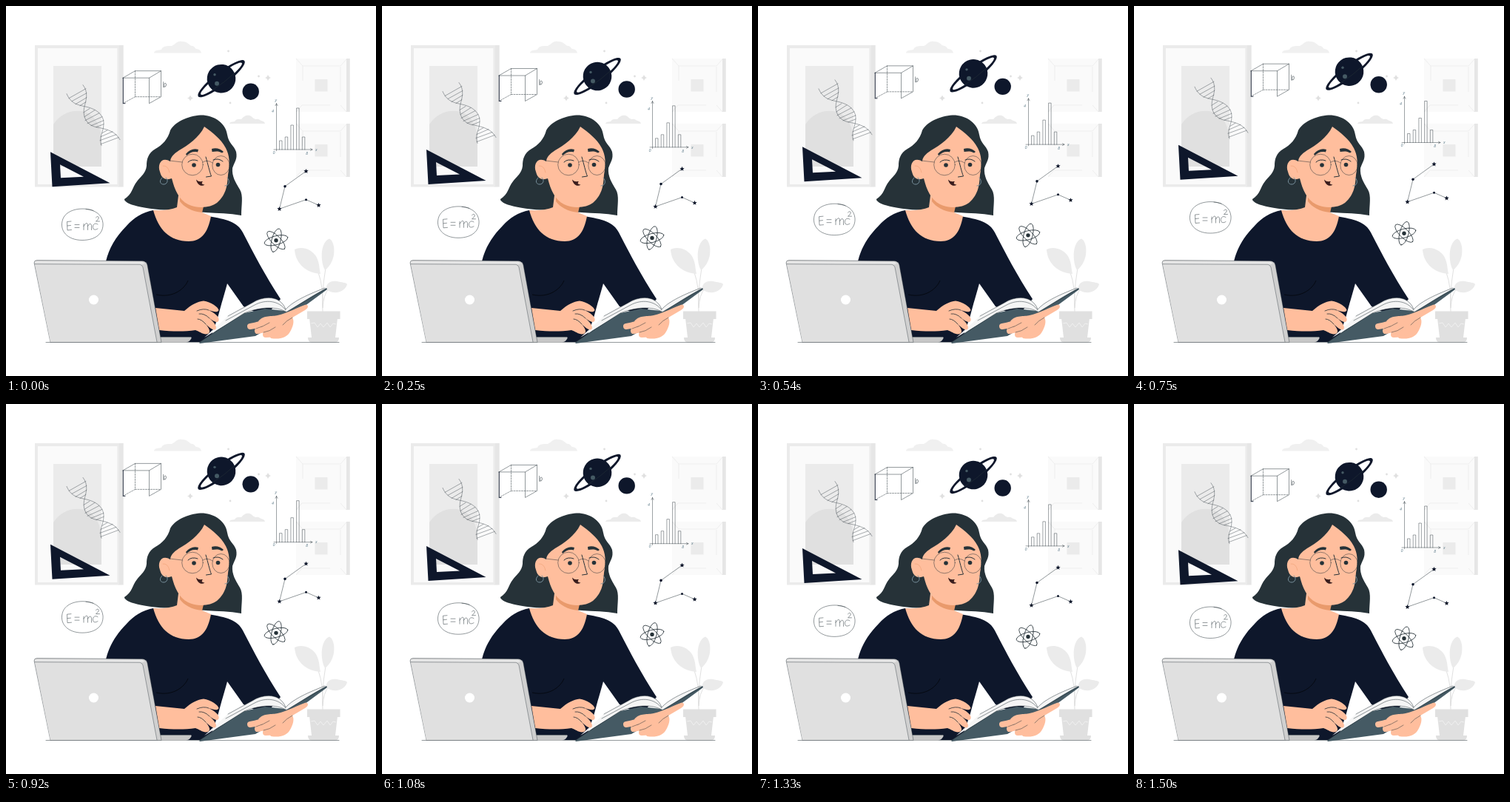
Recreate the animation shown at these times as an HTML page. Size 500 by 500 pixels, loop 1540 ms.

```html
<!DOCTYPE html>
<html lang="en">
<head>
<meta charset="utf-8">
<title>Studying science</title>
<style>
  html, body { margin: 0; height: 100%; overflow: hidden; background: #fff; }
  svg { display: block; width: 100vw; height: 100vh; }
  .navy { fill: #0e172b; }
  .hair { fill: #263238; }
  .skin { fill: #ffbe9d; }
  .line { fill: none; stroke: #263238; stroke-width: .5; stroke-linecap: round; stroke-linejoin: round; }
  .finger { fill: none; stroke: #ffbe9d; stroke-width: 8; stroke-linecap: round; }
  text { font: italic 5.5px "Open Sans", sans-serif; fill: #607d8b; }
</style>
</head>
<body>
<svg viewBox="0 0 500 500">
  <defs>
    <g id="frame">
      <path fill="#e6e6e6" d="M460 71h4.700v72h-4.700z"/>
      <path fill="#fafafa" d="M392 71h68v72h-68z"/>
      <path fill="none" stroke="#e6e6e6" stroke-width=".6" d="M392 71l9 10h51l8-9M401 81v20M452 82v34M392 143l8-9h38M452 134l8 9"/>
      <path fill="#ebebeb" d="M417.500 99h17v16.500h-17z"/>
    </g>
    <path id="spark" fill="#e0e0e0" d="M0-4.200Q.8-.8 4.200 0Q.8.8 0 4.200Q-.8.8-4.200 0Q-.8-.8 0-4.200z"/>
    <path id="star" class="navy" d="M0-3.200L.9-1.100 3.100-1 1.400.5 1.900 2.700 0 1.500-1.900 2.700-1.400.5-3.100-1-.9-1.100z"/>
    <ellipse id="orbit" class="line" style="stroke-width:.8" rx="16.300" ry="6"/>
  </defs>

  <!-- wall -->
  <path fill="#e6e6e6" d="M152 53h6.700v191.500H152z"/>
  <path fill="#ebebeb" d="M39 53h114v191.500H39z"/>
  <path fill="#fafafa" d="M43 57h107.500v184H43z"/>
  <path fill="#ebebeb" d="M64 81h65v136H64z"/>
  <path fill="#e0e0e0" d="M64 160C74 144 92 139 106 143C121 148 129 163 129 185V217H64z"/>
  <use href="#frame"/>
  <use href="#frame" y="88"/>
  <path fill="#f0f0f0" d="M200 63.500C201 59 206 60 210 59C212 53 220 54 224 54C229 52 230 47 238 48C247 48 247 54 252 54C255 54 255 58 258 58C262 59 263 60 264 63.500z"/>
  <path fill="#ebebeb" d="M302 159C303 156 306 157 309 156C311 152 315 153 318 153C321 149 325 147 329 148C333 149 334 153 338 153C342 152 343 155 345 155C348 156 349 156 350 159z"/>
  <use href="#spark" x="249" y="124.500"/>
  <use href="#spark" x="354" y="97"/>
  <g fill="#e0e0e0"><circle cx="300.500" cy="61" r="1.400"/><circle cx="303" cy="131" r="1.400"/><circle cx="341.500" cy="95" r="1.400"/></g>

  <!-- plant -->
  <path fill="none" stroke="#e0e0e0" d="M428 413Q426 390 432 354M428 408Q429 380 422 360M428 408Q429 390 436 382"/>
  <g fill="#ebebeb">
    <path d="M425 362C403 360 391 346 390 329C399 324 414 328 420 340C424 349 423 354 425 362z"/>
    <path d="M431 357C424 344 425 319 437 314.500C445 318 448 344 431 357z"/>
    <path d="M433 383C432 375 438 371 447 372C454 374 459 373 461 376C459 385 445 392 433 383z"/>
  </g>
  <path fill="#e0e0e0" d="M410 422h38l-3 26h-32zM408 448h42q0 6-5 6.500h-32q-5-.5-5-6.500z"/>
  <path fill="#e0e0e0" d="M407 412.500h44.500v10.500H407z"/>
  <path fill="none" stroke="#f0f0f0" d="M412 429l5-1 4 6 4-5 4 5 5-6 4 6 4-5 4 1"/>

  <path class="line" d="M54 454.500H450"/>

  <!-- body -->
  <path class="navy" d="M199 276C184 279 173 286 163 297C148 312 139 328 135 345V400L200 454H275L287 418C291 402 295 390 299 375L321 406 350 420 371 396C350 364 334 333 320 306C313 292 298 288 273 284z"/>
  <path fill="none" stroke="#000" stroke-width=".6" d="M203 390C225 395 241 383 246 371"/>
  <path class="hair" d="M267 147.500C252 147 230 154 222 168C219 180 211 188 202 193C192 199 190 207 190 216C189 226 182 230 177 237C170 246 171 254 160 261C159 267 185 276 233 276L270 279C286 280 302 280 318 283C318 269 321 256 316 248C310 238 305 230 306 219C309 210 313 207 311 197C308 188 301 186 299 174C297 159 283 149 267 147.500z"/>
  <path class="skin" d="M199 276Q220 277 231 272L235 240 266 262 265 279 277 284C273 306 264 318 247 318C221 318 206 302 199 276z"/>
  <path fill="#e99a6c" d="M235 257C245 268 257 272 267 271L265 279C251 278 240 271 235 264z"/>
  <path class="skin" d="M222 210C211 203 204 213 208 224C210 233 216 236 224 233C228 249 234 262 246 268C258 274 276 273 285 266C299 254 299 240 300 228C303 212 302 202 297 192C290 179 279 171 268 163C261 178 246 188 234 195C226 200 222 205 222 210z"/>
  <path class="line" d="M212 216Q219 215 221 225" style="stroke:#e99a6c"/>

  <!-- face -->
  <g class="line">
    <circle cx="252" cy="214.500" r="14.300"/>
    <ellipse cx="290.500" cy="215.500" rx="11.700" ry="13"/>
    <path d="M266 211Q272 207 279 212M238 211L221 209"/>
    <path style="stroke-width:1" d="M270 204C273 214 275 224 277.500 230L270.500 231M246 211Q251 206 259 209M280 208Q287 205 293 210"/>
    <path style="stroke:#78909c;stroke-width:1" d="M211 232C206 237 209 241 213 241C218 241 220 235 216 232M299 232C303 236 302 243 296 243"/>
  </g>
  <g class="hair">
    <circle cx="254" cy="215" r="2.800"/><circle cx="286.500" cy="214.500" r="2.800"/>
    <path d="M243 200C248 194 254 192 260 194L259 197.500C253 196 249 198 244 202zM278 193C284 191 290 193 294 197L292 198.500C288 196 284 196 278.500 197z"/>
    <path fill="#3a1d1d" d="M257 234.500C260 238 263 237 266 237C264 239 264 241 268.500 241.500C264 245 258 241 257 234.500z"/>
  </g>

  <!-- book -->
  <path fill="#455a64" d="M261 455L285 438 322 415 350 409 377 412 433 381 434 383 396 411 337 446 262 456z"/>
  <path fill="#f5f5f5" d="M268 448L300 419 333 401C349 391 371 391 378 410C386 401 402 392 431 381L379 413.500C364 405 343 407 322 415z"/>
  <path class="line" d="M300 419L333 401C349 391 371 391 378 410C386 401 402 392 431 381M297 425L336 404C351 396 369 398 378 411M379 413.500C364 405 343 407 322 415L262 454M379 413.500L433 382"/>

  <!-- hands -->
  <path class="skin" d="M202 408L241 412C250 404 259 399 267 398.500C277 400 287 407 287.500 411C286 415 280 413 274 411C283 415 290 422 287 426C285 429 279 425 275 422C282 428 286 434 283 437C280 439 274 434 270 430C275 436 277 441 273 443C267 445 262 440 256 438C241 440 226 440 207 438z"/>
  <path class="line" style="stroke-width:.8" d="M274 411Q267 408 258 412M275 422Q268 415 261 416M270 430Q264 423 259 423"/>
  <path class="skin" d="M341 426C348 417 360 420 367 418C380 415 395 407 405 403.500C410 404 408 409 404 411L387 421C390 426 388 433 384 440C380 448 370 451 358 449L350 438z"/>
  <path class="finger" d="M330 433Q344 431 354 425M340 439Q352 437 364 430M351 444Q360 444 370 438"/>
  <path class="line" d="M338 436Q348 433 356 428M348 441Q356 440 364 434M387 421Q379 425 374 431"/>

  <!-- laptop -->
  <path fill="#c7c7c7" d="M203 447H248Q252 447 250 450Q248 454 243 454.500H203z"/>
  <path class="line" d="M208 447.500H249"/>
  <path fill="#d0d0d0" stroke="#263238" stroke-width=".4" d="M38 347Q38 343.500 42 343.500L184 344.500Q190 345 191 350L210 454.500H60z"/>
  <path fill="#e6e6e6" d="M39 345L184 345.500 188 348 183 349.500 39 348.500z"/>
  <path fill="#e0e0e0" d="M39 349L181 349.500Q184 350 185 353L204 454H60z"/>
  <path class="line" style="stroke-width:.4" d="M39 348.700L181 349.300Q184 350 185 353L204 454"/>
  <circle cx="118.500" cy="397" r="6.500" fill="#fff"/>

  <!-- floating science doodles -->
  <g id="doodles">
    <path class="navy" fill-rule="evenodd" d="M60 196.500L140.500 238.500 62.500 243.500zM73 213.500L74 231.500 105 230z"/>

    <g transform="rotate(-37.500 291 97.500)">
      <path class="navy" fill-rule="evenodd" d="M251.500 97.500a39.500 9 0 0 1 79 0a39.500 9 0 0 1-79 0zM256 97.500a35 5.800 0 0 0 70 0a35 5.800 0 0 0-70 0z"/>
      <circle class="navy" cx="291" cy="97.500" r="19.300"/>
      <path class="line" d="M272 102.400Q291 104.200 310 102.400"/>
    </g>
    <circle class="navy" cx="330.700" cy="115" r="11.200"/>
    <g fill="#455a64"><circle cx="285" cy="104" r="3"/><circle cx="282" cy="92" r="1.700"/></g>

    <g class="line">
      <path d="M158 96.500H193.500V131L209.500 122V87H174.500L158 96.500M193.500 96.500L209.500 87"/>
      <path stroke-dasharray="2 1.500" d="M174.500 87V122H209M174.500 122L158 131"/>
      <path style="stroke:#0e172b;stroke-width:.9" d="M158.300 96.500V131H161"/>
      <path d="M212.500 102V109M214 109V104Q217 103 216.500 106.500Q216 109 214 108.500"/>
    </g>

    <g class="line" style="stroke-width:.4">
      <path d="M104 106C112 116 108 127 106 135C103 148 108 160 122 163C138 166 148 169 154 180M82 118C88 132 98 133 106 135C122 138 132 146 132 158C132 170 125 176 129 188"/>
      <path d="M85 124L108 111M89 128L109 117M94 132L109 123M100 134L108 129M105 143L113 138M106 149L120 140M107 154L126 144M110 158L130 149M115 161L132 154M122 163L132 159M130 171L137 167M128 176L144 169M127 181L149 173M128 186L152 177"/>
    </g>

    <g class="line" transform="translate(0 .8)">
      <path d="M118 275C105 270 83 272 77 286C71 302 83 315 103 315C121 315 132 306 131 292C130 281 121 274 108 273"/>
      <path d="M88 289.500L82.500 290 83 301.500 88.500 301M83 295.500L87.500 295M93 294H99M93 298H99M105 301V293M105 296Q109 289 110.500 294V301M110.500 296Q114 290 115.500 295V301M124 293.500C119 290 116 296 118 299.500Q120 302 124 299.500M121.500 284.500Q124 281.500 125.500 284.500Q125 287 121.500 289.500H126.500"/>
    </g>

    <g class="line" style="stroke-width:.45">
      <path d="M365.500 195V131M364 134L365.500 131 367 134M362 193.300H414M411.500 192L414 193.300 411.500 194.600"/>
      <path id="bars"/>
    </g>
    <text x="363.500" y="128">y</text><text x="359" y="143">4</text><text x="360.500" y="199">0</text><text x="405" y="200">8</text><text x="418" y="195">x</text>

    <path class="line" d="M405.500 222.500L377 243 369.500 273.500 405.500 261 422.500 268.500"/>
    <use href="#star" x="405.500" y="222.500"/><use href="#star" x="369.500" y="273.500"/><use href="#star" x="422.500" y="268.500"/>
    <circle class="navy" cx="377" cy="243" r="1.800"/><circle class="navy" cx="405.500" cy="261" r="1.500"/>

    <g transform="translate(365 316)">
      <use href="#orbit" transform="rotate(-15)"/><use href="#orbit" transform="rotate(45)"/><use href="#orbit" transform="rotate(105)"/>
      <circle class="hair" r="2.700"/>
    </g>
  </g>
</svg>
<script>
  const LOOP = 1540, CYCLE = 1500, RISE = 9.5, REST = 0.7;
  const doodles = document.getElementById('doodles');

  const barHeights = [12, 17, 33, 56, 17];
  document.getElementById('bars').setAttribute('d',
    barHeights.map((h, i) => `M${369.5 + i * 7.7} 193.300v${-h}h3.500v${h}`).join(''));

  const start = performance.now();
  function draw() {
    const t = Math.min((performance.now() - start) % LOOP, CYCLE);
    const lift = RISE * (1 - Math.abs(2 * t / CYCLE - 1));
    doodles.setAttribute('transform', `translate(0 ${REST - lift})`);
    requestAnimationFrame(draw);
  }
  draw();
</script>
</body>
</html>
```
